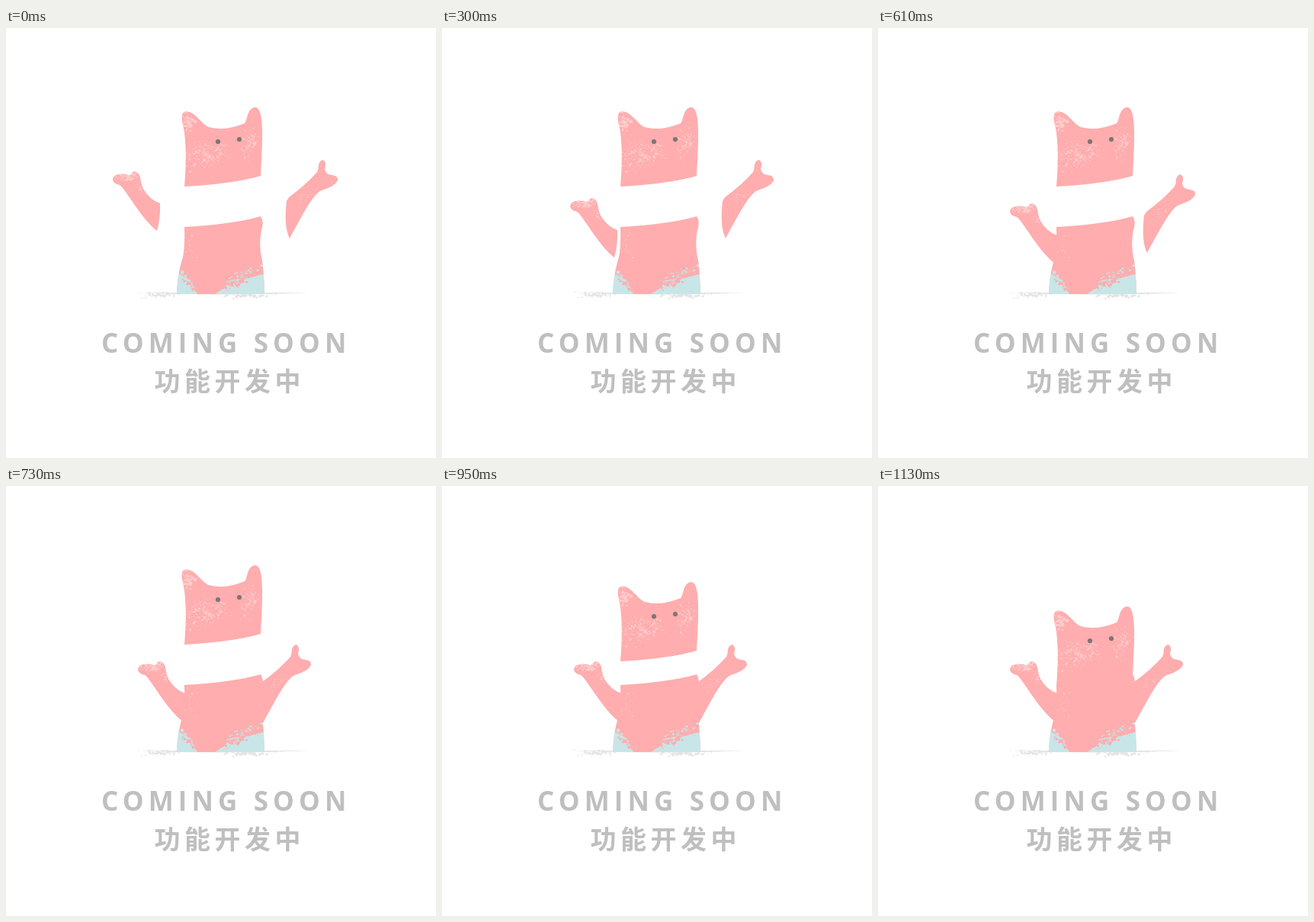
An HTML page with a canvas that plays this animation: 564x564 px, repeating every 1560 ms.

```html
<!DOCTYPE html>
<html lang="zh-CN">
<head>
<meta charset="utf-8">
<title>Coming soon</title>
<style>
  html, body { margin: 0; width: 100%; height: 100%; overflow: hidden; background: #fff; }
  canvas { display: block; }
</style>
</head>
<body>
<canvas id="stage" width="564" height="564"></canvas>
<script>
const ctx = document.getElementById('stage').getContext('2d');
const LOOP = 1560, STEP = 30;
const PINK = '#ffadae', PALE = '#ffcbcb', BLUE = '#c8e6e8', GREY = '#e4e4e4', INK = '#bfbfbf';

let seed = 7;
function rnd() {
  seed = (seed * 16807) % 2147483647;
  return seed / 2147483647;
}
const spread = () => (rnd() + rnd() + rnd() - 1.5) / 1.5;

// Random flecks filling a sloped ellipse around x, y; density sets their number.
function flecks(color, x, y, rx, ry, slope, size, density = 0.2) {
  const path = new Path2D();
  for (let i = rx * ry * density; i > 0; i--) {
    const dx = spread() * rx, r = 0.5 + rnd() * rnd() * size;
    const cx = x + dx, cy = y + dx * slope + spread() * ry;
    path.moveTo(cx + r, cy);
    path.ellipse(cx, cy, r, r * (0.5 + rnd() / 2), 0, 0, 7);
  }
  return { color, path };
}

// Two colours crumbling into each other along a slope.
const frayed = (x, y, rx, ry, slope) =>
  [BLUE, PINK].map((color, i) => flecks(color, x, y + i * 4, rx, ry, slope, 2.2, 0.3));

const fill = (color, d) => ({ color, path: new Path2D(d) });

const head = {
  shape: new Path2D(`M234 262 Q238 214 233 185 Q227 164 236 163.5 C248 163 255 179 266 184
    Q286 190 313 179 C317 174 316 160 326 158 C337 157 338 185 334 248 Q300 258 234 262Z`),
  marks: [
    flecks(PALE, 238, 176, 12, 18, 0.2, 2.5, 0.3),
    flecks(PALE, 262, 220, 40, 26, -0.25, 1.3),
    flecks(PALE, 320, 207, 20, 24, -0.3, 1.3)
  ]
};

const leftArm = {
  shape: new Path2D(`M235 272 Q221 267 213 253 Q210 246 209 238 Q206 228 199 231 Q196 237 191 234
    Q175 232 173 240 Q173 246 182 248 C190 253 210 292 231 308 Q236 290 235 272Z`),
  marks: [
    flecks(PALE, 192, 238, 22, 8, 0, 2.5, 0.4),
    flecks(PALE, 209, 250, 12, 12, 0.6, 1)
  ]
};

const rightArm = {
  shape: new Path2D(`M336 257 Q358 241 373 224 Q375 220 375 214 Q377 208 381 208 Q386 211 383 220
    Q384 227 393 228 Q401 229 400 235 Q396 243 379 248 C368 252 354 280 337 311 Q329 295 333 262Z`),
  marks: [flecks(PALE, 356, 258, 20, 12, -0.7, 0.8, 0.1)]
};

const body = {
  shape: new Path2D(`M234 261 Q300 257 334 247 Q339 255 335 265 Q331 285 336 305 Q338 315 339 349
    H224 Q225 325 230 307 Q235 295 234 261Z`),
  marks: [
    flecks(PALE, 245, 283, 14, 26, 0, 0.9, 0.06),
    fill(BLUE, 'M222 322 Q240 324 251 349 H222Z'),
    fill(BLUE, 'M274 349 Q300 331 341 322 V349Z'),
    ...frayed(308, 327, 36, 10, -0.5),
    ...frayed(240, 332, 13, 7, 0.9)
  ]
};

const ground = [
  fill(GREY, 'M170 347 H400 Q285 352 170 347Z'),
  flecks(GREY, 315, 350.5, 55, 6, 0, 2.2, 0.3),
  flecks(GREY, 203, 350.5, 32, 6, 0, 2.2, 0.3)
];

function paint(marks) {
  for (const { color, path } of marks) {
    ctx.fillStyle = color;
    ctx.fill(path);
  }
}

function part({ shape, marks }, dx = 0, dy = 0) {
  ctx.save();
  ctx.translate(Math.round(dx), Math.round(dy));
  ctx.fillStyle = PINK;
  ctx.fill(shape);
  ctx.clip(shape);
  paint(marks);
  ctx.restore();
}

function eye(x, y) {
  ctx.fillStyle = '#7d7677';
  ctx.beginPath();
  ctx.arc(x, y, 3.1, 0, 7);
  ctx.fill();
}

function label(text, font, x, y, spacing) {
  ctx.font = font;
  ctx.letterSpacing = spacing + 'px';
  ctx.fillStyle = INK;
  ctx.fillText(text, x, y);
}

// Share of the way still to go, moving in even steps.
function left(t, start, steps) {
  const done = Math.floor((t - start) / STEP) + 1;
  return 1 - Math.max(0, Math.min(steps, done)) / steps;
}

function draw(t) {
  ctx.fillStyle = '#fff';
  ctx.fillRect(0, 0, 564, 564);
  paint(ground);
  part(body);

  const l = left(t, 30, 12), r = left(t, 490, 9);
  const lift = Math.round(54 * left(t, 860, 10));
  part(leftArm, -33 * l, -42 * l);
  part(rightArm, 35 * r, -35 * r);
  part(head, 0, -lift);
  eye(278, 203 - lift);
  eye(306, 200 - lift);

  label('COMING SOON', '700 35px "Open Sans", "Noto Sans", sans-serif', 125, 426, 6.1);
  label('功能开发中', '700 34px "Noto Sans CJK SC", "Noto Sans CJK", sans-serif', 194.5, 476, 5.5);
}

const start = performance.now();
function tick() {
  draw((performance.now() - start) % LOOP);
  requestAnimationFrame(tick);
}
tick();
</script>
</body>
</html>
```
